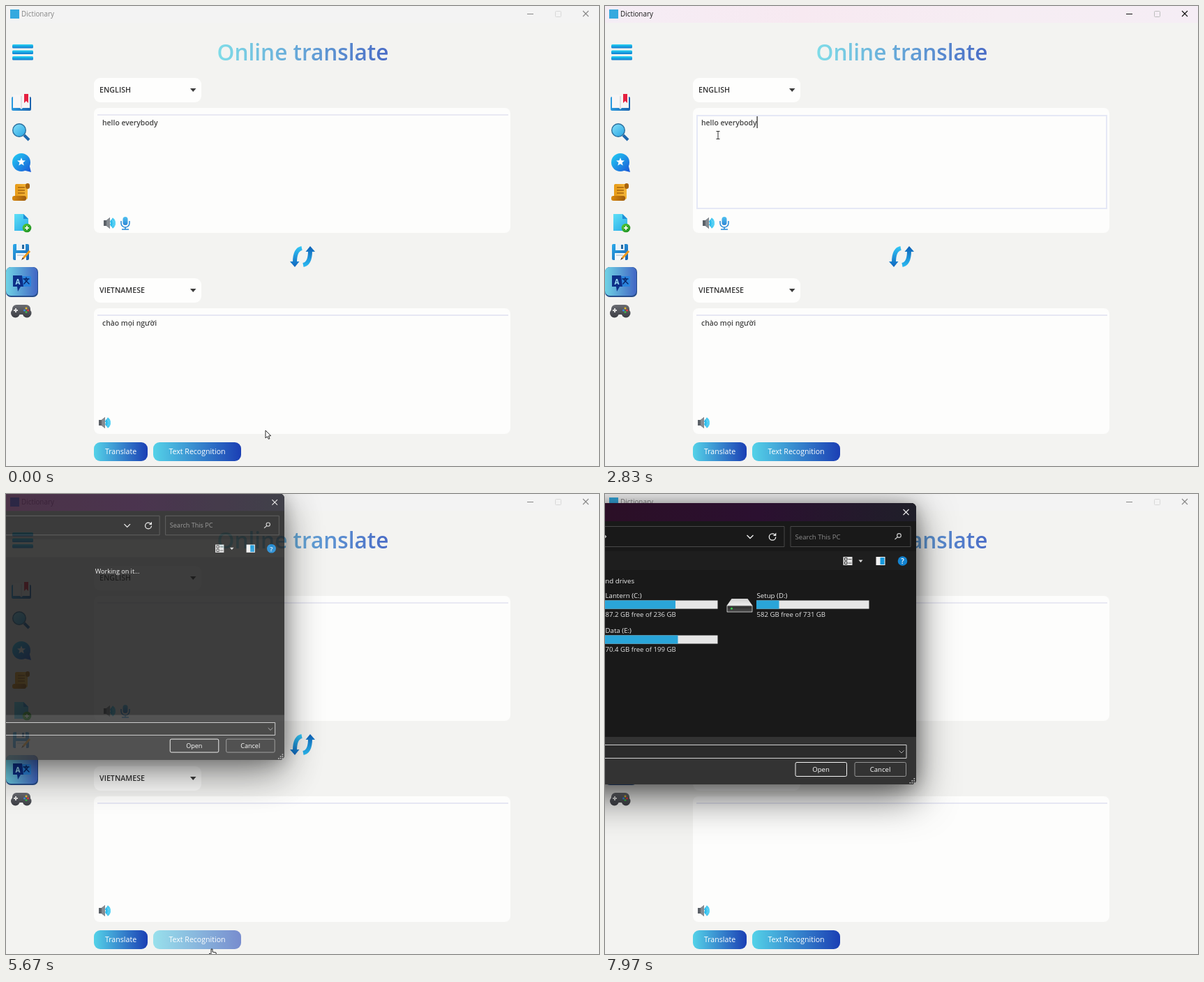
These frames come from a looping animation (850 by 659 pixels, 8 s). An HTML page with a canvas:

```html
<!DOCTYPE html>
<html lang="en">
<head>
<meta charset="utf-8">
<title>Dictionary</title>
<style>
  html, body { margin: 0; width: 100%; height: 100%; overflow: hidden; background: #f3f3f1; }
  canvas { display: block; }
</style>
</head>
<body>
<canvas id="stage" width="850" height="659"></canvas>
<script>
const LOOP = 8000;
const FONT = '"Open Sans", "Noto Sans", sans-serif';
const FOCUS = 2400, BLUR = 5450, OPEN = 5570, LOADED = 6080;
const INPUT = 'hello everybody';
const stage = document.getElementById('stage').getContext('2d');
const layer = Object.assign(document.createElement('canvas'), { width: 850, height: 659 });
const layerCtx = layer.getContext('2d');
let g = stage;

// time, x, y of the pointer
const PATH = [
  [0, 372, 608], [60, 372, 607], [830, 331, 470], [1100, 296, 372], [1330, 292, 362],
  [1640, 239.5, 163], [2420, 239.5, 163], [2790, 162, 185], [3950, 162, 185],
  [4470, 310.5, 477], [5080, 295, 651], [6330, 295, 651], [6800, 205, 425],
  [7100, 60, 215], [7170, -25, 140]
];

const clamp = v => Math.max(0, Math.min(1, v));
const smooth = v => { v = clamp(v); return v * v * (3 - 2 * v); };
const span = (t, a, b) => clamp((t - a) / (b - a));
const inside = (p, x, y, w, h) => p.x >= x && p.x <= x + w && p.y >= y && p.y <= y + h;

function pointerAt(t) {
  const i = PATH.findIndex(k => k[0] > t);
  if (i < 0) return { x: -25, y: 140 };
  const a = PATH[i - 1], b = PATH[i], k = smooth(span(t, a[0], b[0]));
  return { x: a[1] + (b[1] - a[1]) * k, y: a[2] + (b[2] - a[2]) * k };
}

function ramp(x0, y0, x1, y1, ...colors) {
  const r = g.createLinearGradient(x0, y0, x1, y1);
  colors.forEach((c, i) => r.addColorStop(i / (colors.length - 1), c));
  return r;
}
function box(x, y, w, h, color, r = 0) {
  g.fillStyle = color;
  g.beginPath();
  g.roundRect(x, y, w, h, r);
  g.fill();
}
function frame(x, y, w, h, color, r = 0, lw = 1) {
  g.strokeStyle = color;
  g.lineWidth = lw;
  g.beginPath();
  g.roundRect(x, y, w, h, r);
  g.stroke();
}
function trace(pts) {
  g.beginPath();
  for (let i = 0; i < pts.length; i += 2) g.lineTo(pts[i], pts[i + 1]);
}
function poly(color, ...pts) {
  trace(pts);
  g.closePath();
  g.fillStyle = color;
  g.fill();
}
function line(color, lw, ...pts) {
  trace(pts);
  g.strokeStyle = color;
  g.lineWidth = lw;
  g.stroke();
}
function disc(x, y, r, color) {
  g.fillStyle = color;
  g.beginPath();
  g.arc(x, y, r, 0, 7);
  g.fill();
}
function arc(x, y, r, a, b, color, lw) {
  g.strokeStyle = color;
  g.lineWidth = lw;
  g.beginPath();
  g.arc(x, y, r, a, b);
  g.stroke();
}
function text(s, x, y, size, color, weight = 400, align = 'left') {
  g.font = `${weight} ${size}px ${FONT}`;
  g.textAlign = align;
  g.fillStyle = color;
  g.fillText(s, x, y);
}

function titleBar(focused) {
  box(0, 0, 850, 24, focused ? ramp(0, 0, 850, 0, '#f5edf5', '#f7e9f1', '#f6edf3', '#f5edf5') : '#f3f3f3');
  box(6, 5, 13, 13, '#35a9df');
  text('Dictionary', 22, 15, 9.9, focused ? '#1a1a1a' : '#858585');
  const ink = focused ? '#111' : '#888';
  line(ink, 1, 747, 11.5, 756, 11.5);
  frame(787.5, 7.5, 8, 8, focused ? '#bdbdbd' : '#d8d8d8', 1);
  line(ink, 1.1, 827, 7, 835, 15);
  line(ink, 1.1, 835, 7, 827, 15);
}

function menuIcons() {
  for (const y of [55, 63.5, 72]) box(9, y, 30, 5.5, ramp(0, y, 0, y + 5.5, '#25d3f3', '#0f78cf'), 1.5);

  // book
  box(8, 130, 28, 20, ramp(8, 0, 36, 0, '#2b9be0', '#1a62ad'), 2);
  poly('#f7f5f5', 10, 127, 20, 127, 22, 129, 24, 127, 34, 127, 34, 146, 24, 146, 22, 148, 20, 146, 10, 146);
  line('#c9c9d0', 1, 22, 129, 22, 147);
  poly('#e5203f', 26, 126, 32, 126, 32, 139, 29, 136, 26, 139);

  // search
  line('#1f68ad', 4, 26, 185, 33, 192);
  disc(19, 178, 10, '#2a6f9e');
  disc(19, 178, 8.6, ramp(12, 170, 26, 186, '#7fdcf8', '#2fa9e4'));

  // favourites
  const bubble = ramp(10, 212, 34, 236, '#22ccf4', '#1a5fd8');
  disc(22, 224, 13, bubble);
  poly(bubble, 24, 235, 33, 226, 36, 238);
  const star = [];
  for (let i = 0; i < 10; i++) {
    const a = i * Math.PI / 5 - Math.PI / 2, r = i % 2 ? 2.7 : 6.3;
    star.push(22 + r * Math.cos(a), 223.5 + r * Math.sin(a));
  }
  poly('#fff', ...star);

  // history scroll
  box(13, 255, 18, 22, ramp(13, 0, 31, 0, '#e79a16', '#f3b53a'), 2);
  box(28, 254, 6, 8, '#a9640c', 3);
  box(9, 272, 20, 7, ramp(9, 0, 29, 0, '#d98910', '#9d5b0c'), 3);
  for (const y of [260, 264, 268]) line('#945408', 1.2, 17, y, 27, y);

  // new file
  poly(ramp(12, 298, 32, 322, '#5fe0f7', '#27a9e6'), 12, 298, 25, 298, 32, 305, 32, 322, 12, 322);
  poly('#1e8fd6', 25, 298, 32, 305, 25, 305);
  disc(30, 318, 6.3, ramp(24, 312, 36, 324, '#58cb38', '#178b21'));
  line('#fff', 1.6, 27, 318, 33, 318);
  line('#fff', 1.6, 30, 315, 30, 321);

  // save and edit
  box(10, 341, 23, 23, ramp(10, 341, 33, 364, '#2aa9ea', '#1b63b0'), 2);
  box(15, 341, 13, 9, '#e9f3fa');
  box(23, 342, 3, 6, '#27699f');
  box(14, 354, 15, 10, '#f6f8fa');
  line('#9bb7cc', 1, 16, 357, 26, 357);
  line('#ef9a1d', 3, 25, 361, 34, 351);
  poly('#5a3b22', 22, 364, 24, 360, 26, 362);

  // active translate entry
  box(0, 374, 46, 43, '#284f8c', 7);
  box(0, 374, 45, 41, ramp(0, 0, 45, 0, '#6fd3e5', '#4266c4'), 7);
  box(22, 387, 14, 15, '#2b83dc', 1.5);
  poly('#0d2f88', 10, 386, 23, 386, 25, 402, 21, 402, 17, 409, 16, 402, 10, 402);
  text('A', 17, 399, 10, '#9fe0f5', 700, 'center');
  g.lineCap = 'round';
  line('#082467', 1.4, 25, 391, 33, 391);
  line('#082467', 1.4, 29, 389, 29, 391);
  line('#082467', 1.4, 26, 398, 31, 392);
  line('#082467', 1.4, 27, 392, 33, 398);
  g.lineCap = 'butt';

  // games
  const shell = ramp(0, 428, 0, 447, '#6a6c72', '#3a3c42');
  box(9, 428, 26, 14, shell, 6);
  disc(13.5, 440, 6.5, shell);
  disc(30, 440, 6.5, shell);
  line('#ddd', 2, 11, 436, 17, 436);
  line('#ddd', 2, 14, 433, 14, 439);
  disc(29, 433, 1.5, '#e8bd2e');
  disc(26.5, 436, 1.5, '#3c8be0');
  disc(31.5, 436, 1.5, '#e33c3c');
  disc(29, 438.5, 1.5, '#3bb54a');
}

function combo(y, label) {
  box(126, y, 154, 35, '#fefefd', 9);
  text(label, 134, y + 21, 10.7, '#333', 600);
  poly('#3c3c3c', 264, y + 15, 272.5, y + 15, 268.2, y + 20);
}
function speaker(x, y) {
  const wave = ramp(x + 1, 0, x + 10, 0, '#19b4ea', '#6fdcf8');
  arc(x, y, 4, -1.1, 1.1, wave, 4);
  arc(x, y, 7.6, -1, 1, wave, 3.2);
  poly('#5b6168', x - 8, y - 4, x - 4, y - 4, x + 1, y - 8, x + 1, y + 8, x - 4, y + 4, x - 8, y + 4);
  poly('#858b91', x - 4, y - 4, x + 1, y - 8, x + 1, y + 8, x - 4, y + 4);
}
function mic() {
  box(167.5, 302, 7, 12, ramp(0, 302, 0, 314, '#4fc3f2', '#2f85d4'), 3.5);
  g.strokeStyle = '#2f8ed8';
  g.lineWidth = 1.6;
  g.beginPath();
  g.moveTo(165, 308);
  g.lineTo(165, 311);
  g.arc(171, 311, 6, Math.PI, 0, true);
  g.lineTo(177, 308);
  g.stroke();
  line('#2f8ed8', 1.6, 171, 317, 171, 320);
  line('#2f8ed8', 1.6, 166, 320, 176, 320);
}
function swapArrows() {
  for (const turn of [0, Math.PI]) {
    g.save();
    g.translate(425, 359);
    g.rotate(turn);
    const blue = turn ? ramp(0, 14, 0, -14, '#0e62b8', '#2bb9f1') : ramp(0, -14, 0, 14, '#32c6f6', '#0f68c0');
    g.strokeStyle = blue;
    g.lineWidth = 6;
    g.beginPath();
    g.moveTo(-1, -12);
    g.quadraticCurveTo(-11, -10, -11, 8);
    g.stroke();
    poly(blue, -18, 7, -4.5, 7, -11, 15);
    g.restore();
  }
}
function button(x, w, label, hover) {
  g.globalAlpha = hover ? 0.57 : 1;
  box(x, 625, w, 27, ramp(x, 0, x + w, 0, '#54d2e8', '#1b3fb4'), 9);
  g.globalAlpha = 1;
  text(label, x + w / 2, 642, 10.6, '#fff', 500, 'center');
}

function drawApp(t, p) {
  const focused = t >= FOCUS && t < BLUR;
  box(0, 0, 850, 659, '#f3f3f1');
  titleBar(focused);
  menuIcons();
  text('Online translate', 425.5, 78, 31.6, ramp(303, 0, 548, 0, '#7fdce8', '#4a6cc6'), 600, 'center');

  combo(103, 'ENGLISH');
  box(126, 146, 597, 179, '#fdfdfc', 8);
  if (focused) frame(132, 157, 587, 133, '#e5e8f6', 0, 2);
  else box(131, 155, 589, 2, '#e9e9f3');
  const left = Math.round(INPUT.length * (1 - span(t, 3080, 3990)));
  const typed = INPUT.slice(0, left);
  text(typed, 138, 170.5, 10.4, '#444', 600);
  const since = t - (t < 3080 ? FOCUS : Math.min(t, 4000));
  if (focused && since % 1000 < 500) box(Math.round(138 + g.measureText(typed).width) - 0.5, 158, 1.2, 17, '#222');
  speaker(148, 311);
  mic();
  swapArrows();

  combo(390, 'VIETNAMESE');
  box(126, 433, 597, 180, '#fdfdfc', 8);
  box(131, 442, 589, 2, '#e6e7f3');
  if (t < 4050) text('chào mọi người', 138, 457.5, 10.4, '#444', 600);
  speaker(141, 597);
  button(126, 77, 'Translate', inside(p, 126, 625, 77, 27));
  button(211, 126, 'Text Recognition', inside(p, 211, 625, 126, 27));
}

function drive(x, y, name, info, used) {
  text(name, x, y, 9.7, '#f0f0f0');
  box(x - 0.5, y + 3.5, 161.5, 12, '#e6e6e6');
  box(x - 0.5, y + 3.5, used, 12, '#2aa5d9');
  text(info, x, y + 27, 9.6, '#e4e4e4');
}
function drives(hover) {
  text('Devices and drives', 15.5, 105, 9.7, '#f0f0f0', 400, 'right');
  if (hover) box(-90, 113, 229, 46, '#4b4b4b');
  drive(-26, 126, 'Lantern (C:)', '87.2 GB free of 236 GB', 101);
  drive(-26, 176, 'Data (E:)', '70.4 GB free of 199 GB', 104.5);
  drive(191, 126, 'Setup (D:)', '582 GB free of 731 GB', 32.5);
  poly(ramp(0, 127, 0, 137, '#cfcfcf', '#f2f2f2'), 155, 127, 178, 127, 185, 137, 148, 137);
  box(148, 136.5, 37, 10, '#b5b5b5', 1);
  box(149, 137.5, 35, 8, ramp(0, 137, 0, 146, '#2a2a2a', '#4c4c4c'), 1);
  disc(155, 141, 1.5, '#35d24a');
}

function dialogShadow(offset, blur, alpha) {
  g.shadowColor = `rgba(0,0,0,${alpha})`;
  g.shadowBlur = blur;
  g.shadowOffsetY = offset;
  box(-345, -10, 764.5, 403, '#191919', 7);
  g.shadowColor = 'transparent';
}
function dialogBody(t, hover) {
  dialogShadow(18, 56, 0.6);
  dialogShadow(2, 24, 0.3);
  g.save();
  g.beginPath();
  g.roundRect(-345, -10, 764.5, 403, 7);
  g.clip();
  box(-345, -10, 765, 26, ramp(-30, 0, 420, 0, '#2b0f26', '#2b1030', '#1f1f29'));
  box(-345, 59, 765, 27, '#1e1e1e');
  box(-345, 325, 765, 68, '#333');
  g.restore();
  line('#eee', 1.1, 401, -1, 409, 7);
  line('#eee', 1.1, 409, -1, 401, 7);

  frame(-300.5, 23.5, 531, 29, '#484848');
  frame(239.5, 23.5, 172, 29, '#484848');
  line('#ddd', 1.2, -28, 35, -25, 38, -28, 41);
  line('#eee', 1.4, 177, 36, 181.5, 40.5, 186, 36);
  arc(213.5, 38.5, 4.7, 0, 5.3, '#eee', 1.3);
  poly('#eee', 218.8, 32.5, 218.8, 37, 214.3, 37);
  text('Search This PC', 246, 41.5, 9.6, '#8b8b8b');
  arc(395, 36.5, 2.8, 0, 7, '#ccc', 1.2);
  line('#ccc', 1.2, 393, 38.5, 389, 42);

  box(315, 67, 13, 12, '#e4e4e4');
  for (const y of [68.5, 74]) {
    frame(317, y, 3.5, 3.5, '#333');
    line('#555', 1, 322, y + 2, 327, y + 2);
  }
  poly('#ddd', 337, 71.5, 343, 71.5, 340, 75);
  box(362, 67, 13, 12, '#f2f2f2');
  box(368, 68, 6, 10, '#1598dc');
  disc(400, 73, 6.8, '#1383d0');
  text('?', 400, 76.6, 10, '#fff', 600, 'center');

  if (t < LOADED) text('Working on it...', 133, 110.5, 9.6, '#f0f0f0');
  else drives(hover);

  box(-250, 336, 655, 19, '#2b2b2b');
  frame(-250.5, 336.5, 656, 19, '#d0d0d0');
  line('#aaa', 1, 395, 344.5, 398.5, 348, 402, 344.5);
  frame(246.5, 361.5, 73.5, 20, '#f5f5f5', 2);
  frame(331.5, 361.5, 73.5, 20, '#969696', 2);
  text('Open', 283, 375, 9.6, '#fff', 400, 'center');
  text('Cancel', 368, 375, 9.6, '#fff', 400, 'center');
  for (let i = 0; i < 3; i++)
    for (let j = 0; j <= i; j++) box(416 - j * 3, 384 + i * 3, 1.7, 1.7, '#bbb');
}

function drawDialog(t, p) {
  const k = span(t, OPEN, OPEN + 200);
  if (!k) return;
  const scale = 0.891 + 0.109 * smooth(k);
  const drag = smooth(span(t, 7330, 7940));
  g = layerCtx;
  g.setTransform(1, 0, 0, 1, 0, 0);
  g.clearRect(0, 0, 850, 659);
  g.translate(36.7 + 26.5 * drag, 168.7 + 23 * drag);
  g.scale(scale, scale);
  g.translate(-36.7, -168.7);
  dialogBody(t, t < 7300 && inside(p, -90, 113, 229, 46));
  g = stage;
  g.globalAlpha = 1 - Math.pow(1 - k, 2.6);
  g.drawImage(layer, 0, 0);
  g.globalAlpha = 1;
}

function outlined(...pts) {
  poly('#fff', ...pts);
  trace(pts);
  g.closePath();
  g.strokeStyle = '#111';
  g.lineWidth = 0.9;
  g.stroke();
}
function drawPointer(t, p) {
  const covered = t > OPEN && inside(p, -345, -10, 764, 403);
  const onText = inside(p, 131, 156, 589, 134) || inside(p, 131, 443, 589, 135);
  const onButton = inside(p, 126, 625, 77, 27) || inside(p, 211, 625, 126, 27);
  g.save();
  g.translate(p.x, p.y);
  if (!covered && onText) {
    line('#333', 1, 0, -5, 0, 5);
    line('#333', 1, -2.5, -5.5, 2.5, -5.5);
    line('#333', 1, -2.5, 5.5, 2.5, 5.5);
  } else if (!covered && onButton) {
    outlined(-1, 1, 1, 1, 1, 5, 6, 6, 6.5, 10, 5, 13, 0, 13, -4, 8, -3, 7, -1, 9);
  } else {
    outlined(0, 0, 0, 11, 2.6, 8.7, 4.3, 12.4, 6, 11.6, 4.4, 8, 7.6, 7.7);
  }
  g.restore();
}

function render(now) {
  const t = now % LOOP, p = pointerAt(t);
  drawApp(t, p);
  drawDialog(t, p);
  drawPointer(t, p);
  requestAnimationFrame(render);
}
requestAnimationFrame(render);
</script>
</body>
</html>
```
